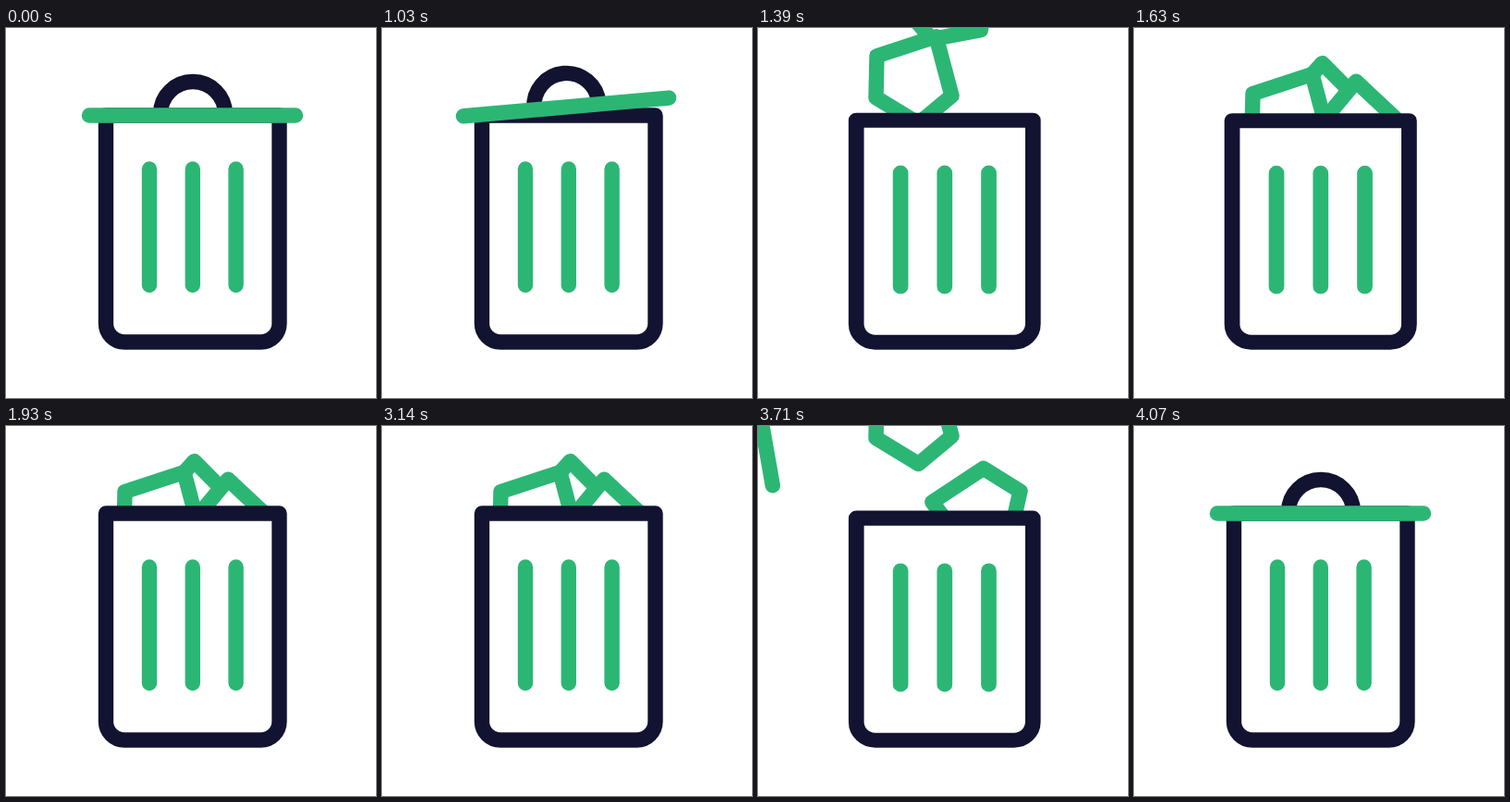
Write an HTML page that moves like this. It is 400 px wide and 400 px high and loops after 4100 ms.

```html
<!DOCTYPE html>
<html lang="en">
<head>
<meta charset="utf-8">
<title>Bin</title>
<style>
  html, body { margin: 0; width: 100%; height: 100%; overflow: hidden; background: #fff; }
  svg { display: block; width: 100%; height: 100%; }
  .ink, .leaf { stroke-width: 16.4; stroke-linecap: round; stroke-linejoin: round; fill: none; }
  .ink { stroke: #121331; }
  .leaf { stroke: #2cb674; }
  .solid { fill: #fff; }
</style>
</head>
<body>
<svg viewBox="0 0 400 400">
  <g id="papers"></g>
  <g id="bin">
    <path class="ink solid" d="M108 94.5H295.5V319.5a20 20 0 0 1-20 20H128a20 20 0 0 1-20-20Z"/>
    <path class="leaf" d="M155 152.5V278M201.8 152.5V278M248.6 152.5V278"/>
  </g>
  <g id="lid">
    <path class="ink" stroke-linecap="butt" d="M167 93a35 35 0 0 1 70 0"/>
    <path class="leaf" d="M90 94.5H313"/>
  </g>
</svg>
<script>
const LOOP = 4100, OPEN = 1000, FULL = 1930, EMPTYING = 3140, STEP = 30;
const $ = id => document.getElementById(id);

// Resting place, turn, turn per pixel of height, landing time; back to front.
const papers = [
  { x: 243, y: 185, turn: -108.5, spin: 0, land: 1421 },
  { x: 205.5, y: 93.5, turn: -30, spin: 0.1, land: 1462 },
  { x: 166.5, y: 99, turn: 0, spin: 0, land: 1425 },
  { x: 244, y: 113, turn: -32, spin: 0, land: 1590 }
];
for (const p of papers) {
  p.el = document.createElementNS('http://www.w3.org/2000/svg', 'polygon');
  p.el.setAttribute('class', 'leaf solid');
  p.el.setAttribute('points', '-38,-28 26,-49 43,15 7,45 -39,17');
  $('papers').append(p.el);
}

const squash = [[1290, 0], [1375, 1], [1480, 0], [1590, 1.3], [1720, 0], [1830, 0.3], [FULL, 0]];

function sample(keys, t) {
  if (t <= keys[0][0]) return keys[0][1];
  for (let i = 1; i < keys.length; i++) {
    const [t0, a] = keys[i - 1], [t1, b] = keys[i];
    if (t < t1) return a + (b - a) * (1 - Math.cos(Math.PI * (t - t0) / (t1 - t0))) / 2;
  }
  return keys[keys.length - 1][1];
}

// Emptying is the filling played backwards.
function phase(t) {
  const steps = from => STEP * Math.floor((t - from) / STEP);
  if (t < OPEN + STEP) return OPEN;
  if (t < EMPTYING) return Math.min(FULL, OPEN + steps(OPEN));
  return Math.max(OPEN, FULL - steps(EMPTYING));
}

function draw(t) {
  for (const p of papers) {
    const height = 0.1966 * Math.max(0, p.land - t) ** 1.5;
    p.el.setAttribute('transform',
      `translate(${p.x} ${p.y - height}) rotate(${p.turn - p.spin * height})`);
  }

  const s = sample(squash, t);
  $('bin').setAttribute('transform',
    `translate(201.8 347.5) scale(${1 + 0.02 * s} ${1 - 0.022 * s}) translate(-201.8 -347.5)`);

  const u = (t - OPEN) / 360;
  $('lid').setAttribute('visibility', t < 1380 ? 'visible' : 'hidden');
  $('lid').setAttribute('transform',
    `translate(${-205 * u ** 1.78} ${-140 * u ** 1.1}) rotate(${-100 * u ** 1.2} 201.5 94.5)`);
}

const start = performance.now();
function frame() {
  draw(phase((performance.now() - start) % LOOP));
  requestAnimationFrame(frame);
}
frame();
</script>
</body>
</html>
```
